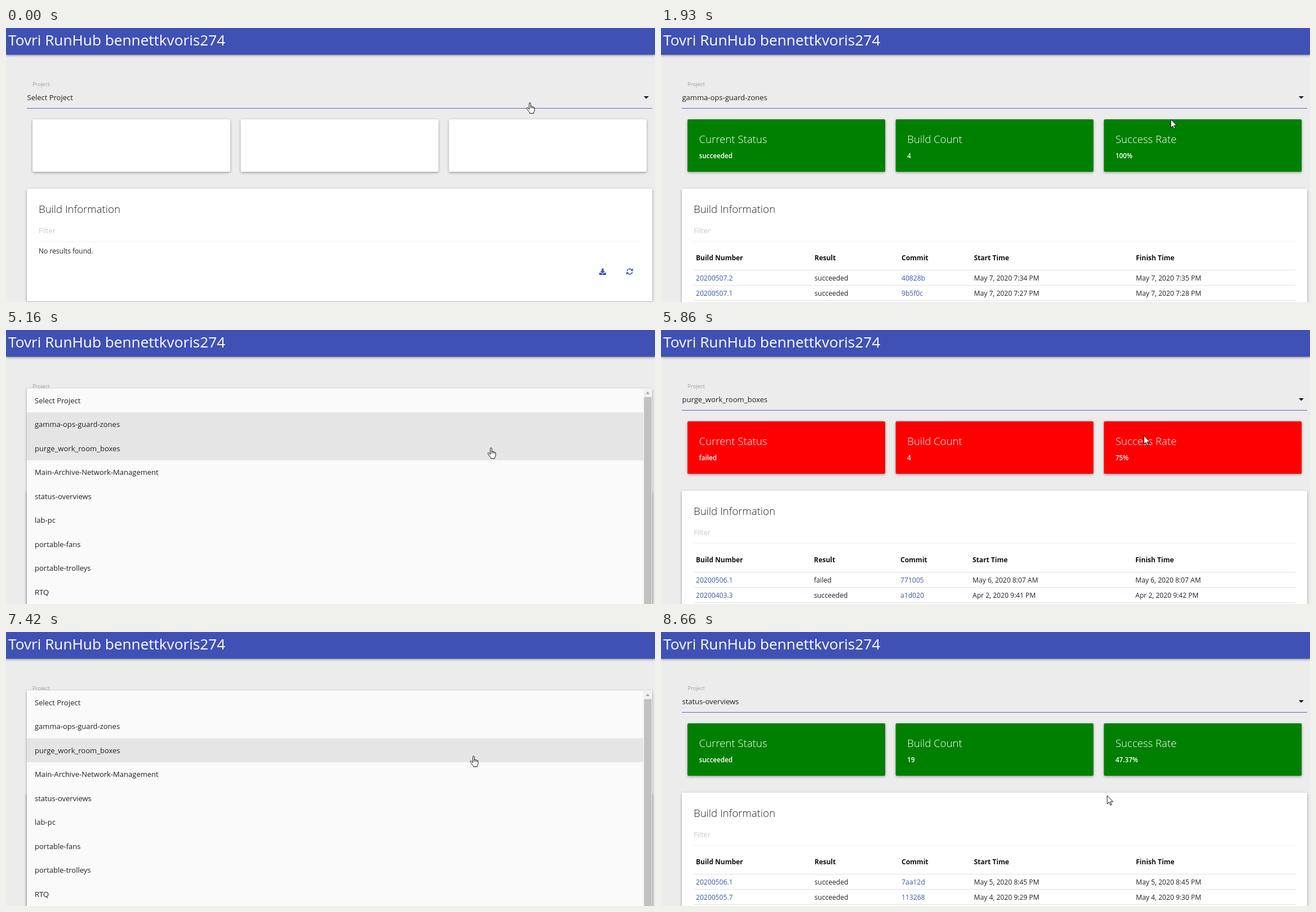
These frames come from a looping animation (1152x486 px, 9520 ms). An HTML page with a canvas:

```html
<!DOCTYPE html>
<html lang="en">
<head>
<meta charset="utf-8">
<title>Build dashboard</title>
<style>
  html, body { margin: 0; width: 100%; height: 100%; overflow: hidden; background: #ececec; }
  canvas { display: block; }
</style>
</head>
<body>
<canvas id="stage" width="1152" height="486"></canvas>
<script>
const stage = document.getElementById('stage').getContext('2d');
const layer = new OffscreenCanvas(1152, 486).getContext('2d');
let ctx = stage; // current drawing surface
const LOOP = 9520, BLUE = '#3f51b5', INK = '#212121';

const OPTIONS = ['Select Project', 'gamma-ops-guard-zones', 'purge_work_room_boxes',
  'Main-Archive-Network-Management', 'status-overviews', 'lab-pc',
  'portable-fans', 'portable-trolleys', 'RTQ'];

const COLUMNS = [62, 272.5, 427, 555.5, 843];
const HEADINGS = ['Build Number', 'Result', 'Commit', 'Start Time', 'Finish Time'];

// Page contents, each valid from its time on
const PAGES = [
  { from: 0, option: 0 },
  { from: 1930, option: 1, color: 'green', stats: ['succeeded', '4', '100%'], rows: [
    ['20200507.2', 'succeeded', '40828b', 'May 7, 2020 7:34 PM', 'May 7, 2020 7:35 PM'],
    ['20200507.1', 'succeeded', '9b5f0c', 'May 7, 2020 7:27 PM', 'May 7, 2020 7:28 PM']] },
  { from: 5480, option: 2, color: 'red', columns: [62, 271.5, 425, 553, 842],
    stats: ['failed', '4', '75%'], rows: [
    ['20200506.1', 'failed', '771005', 'May 6, 2020 8:07 AM', 'May 6, 2020 8:07 AM'],
    ['20200403.3', 'succeeded', 'a1d020', 'Apr 2, 2020 9:41 PM', 'Apr 2, 2020 9:42 PM']] },
  { from: 8660, option: 4, color: 'green', stats: ['succeeded', '19', '47.37%'], rows: [
    ['20200506.1', 'succeeded', '7aa12d', 'May 5, 2020 8:45 PM', 'May 5, 2020 8:45 PM'],
    ['20200505.7', 'succeeded', '113268', 'May 4, 2020 9:29 PM', 'May 4, 2020 9:30 PM']] }
];

const MENUS = [
  { open: 690, hover: 1230, click: 1690, close: 1740, before: 0, after: 1 },
  { open: 3385, hover: 4390, click: 5310, close: 5290, before: 1, after: 2 },
  { open: 6785, hover: 7270, click: 8280, close: 8360, before: 2, after: 4 }
];

// Screen refresh bursts: start, end, number of steps
const BURSTS = [[610, 1000, 6], [1230, 1460, 4], [1690, 1930, 4], [2470, 3080, 9],
  [3310, 3620, 5], [4390, 5160, 11], [5310, 5480, 3], [5790, 6400, 9], [6710, 6960, 4],
  [7270, 7800, 8], [8280, 8280, 1], [8430, 8520, 2], [8660, 8660, 1]];

// Pointer path: time, x, y
const PATH = [[0, 930, 132.5], [1153, 930, 132.5], [1460, 905, 162], [2394, 905, 162],
  [3080, 909.5, 129.5], [4313, 909.5, 129.5], [4390, 908, 148], [5160, 861, 209],
  [5310, 861, 209], [5480, 857, 201], [5714, 857, 201], [6400, 858, 140], [7195, 858, 140],
  [7270, 857, 144], [7345, 846, 176], [7421, 830, 220], [7800, 792, 290], [LOOP, 792, 290]];

const HAND = new Path2D('M5.5 12.5V2Q5.5.6 6.8.6T8.1 2V7.5Q8.3 6.6 9.4 6.6T10.7 8' +
  'Q11 7.3 12 7.5T13 9Q13.4 8.4 14.2 8.7T15 10.2V13Q15 16 13.2 18V19.5H6.5V18' +
  'Q4 15.5 2.8 13.5Q1 11 1 10Q1.6 8.8 3 9.6Q4.5 10.8 5.5 12.5ZM8.1 7.5V10.5M10.7 8V10.5M13 9V11');
const ARROW = new Path2D('M.5.5V15.5L3.9 12.3L6.2 17.7L8.4 16.8L6.1 11.4H10.8Z');

function refreshTime(t) {
  const burst = BURSTS.filter(b => b[0] <= t).pop();
  if (!burst) return 0;
  const [start, end, steps] = burst;
  if (steps === 1) return start;
  const step = (end - start) / (steps - 1);
  return start + step * Math.min(steps - 1, Math.floor((t + 10 - start) / step));
}

function pointerAt(t) {
  const i = PATH.findIndex(p => p[0] > t);
  const [t0, x0, y0] = PATH[i - 1], [t1, x1, y1] = PATH[i];
  const k = (t - t0) / (t1 - t0);
  return { x: x0 + (x1 - x0) * k, y: y0 + (y1 - y0) * k };
}

function menuAt(t) {
  const menu = MENUS.find(m => t >= m.open && t < m.close + 180);
  if (!menu) return null;
  const closing = t >= menu.close;
  const p = closing ? (t - menu.close) / 250 : Math.min(1, (t - menu.open) / 150);
  return {
    ...menu, closing, opening: p < 1 && !closing,
    scale: closing ? 0.3 + 0.7 * 2 ** (-10 * p) : 1 - 0.7 * (1 - p) ** 5,
    alpha: closing ? (1 - p) ** 5 : 1 - (1 - p) ** 2,
    selected: t < menu.click ? menu.before : menu.after
  };
}

function text(str, x, y, size, color = INK, weight = 400) {
  ctx.font = `${weight} ${size}px "Open Sans", "Noto Sans", sans-serif`;
  ctx.fillStyle = color;
  ctx.fillText(str, x, y);
}

function rect(x, y, w, h, color) {
  ctx.fillStyle = color;
  ctx.fillRect(x, y, w, h);
}

function poly(color, ...points) {
  ctx.fillStyle = color;
  ctx.beginPath();
  points.forEach(p => ctx.lineTo(...p));
  ctx.closePath();
  ctx.fill();
}

function raised(x, y, w, h, color, radius = 2) {
  ctx.save();
  ctx.shadowColor = 'rgba(0,0,0,.36)';
  ctx.shadowBlur = 4;
  ctx.shadowOffsetY = 1.5;
  ctx.fillStyle = color;
  ctx.beginPath();
  ctx.roundRect(x, y, w, h, radius);
  ctx.fill();
  ctx.restore();
}

function drawIcons() {
  rect(1053, 434, 12, 4, BLUE);
  poly('#fff', [1053.2, 431], [1064.8, 431], [1059, 436.8]);
  poly(BLUE, [1054.6, 431], [1063.4, 431], [1059, 435.4]);
  rect(1057.3, 426.5, 3.4, 5, BLUE);

  ctx.strokeStyle = BLUE;
  ctx.lineWidth = 1.7;
  for (const turn of [0, Math.PI]) {
    ctx.save();
    ctx.translate(1107, 432);
    ctx.rotate(turn);
    ctx.beginPath();
    ctx.arc(0, 0, 4.7, Math.PI * 1.05, Math.PI * 1.8);
    ctx.stroke();
    poly(BLUE, [6, -5.8], [6, -1.2], [1.4, -1.2]);
    ctx.restore();
  }
}

function drawTable({ rows, columns = COLUMNS }) {
  HEADINGS.forEach((h, i) => text(h, columns[i], 412, 12, '#111', 700));
  rows.forEach((row, r) => row.forEach((cell, i) =>
    text(cell, columns[i], 448 + 27 * r, 12.1, i % 2 || i > 2 ? INK : '#3c57a6')));
  for (const y of [429, 456, 483]) rect(58, y, 1068, 1, '#e0e0e0');
}

function drawPage(page, lineColor) {
  rect(0, 0, 1152, 486, '#ececec');
  raised(0, -5, 1152, 52.5, BLUE, 0);
  text('Tovri RunHub bennettkvoris274', 4, 31, 26.2, '#fff');

  text('Project', 47, 103, 9.5, '#9e9e9e');
  text(OPTIONS[page.option], 37.5, 128, 13);
  poly('#111', [1132, 121], [1141, 121], [1136.5, 125.5]);
  rect(37, 142, 1110, 0.85, lineColor);

  ['Current Status', 'Build Count', 'Success Rate'].forEach((name, i) => {
    const x = 47 + 369.6 * i;
    raised(x, 162, 351, 93, page.color || '#fff');
    if (!page.stats) return;
    text(name, x + 20.5, 204, 18.6, '#fff', 300);
    text(page.stats[i], x + 20.5, 231, 11.7, '#fff', 600);
  });

  raised(37, 285, 1110, page.rows ? 230 : 200, '#fff');
  text('Build Information', 58, 328, 18.6, INK, 300);
  text('Filter', 58, 364, 12.8, '#c8c8c8');
  rect(58, 378, 1068, 1, '#eee');
  if (page.rows) {
    drawTable(page);
  } else {
    text('No results found.', 58, 400, 12);
    drawIcons();
  }
}

const MENU_TOP = 103.6, ROW = 42.5;

// Painted opaque on its own layer, so that the menu fades as one piece
function drawMenu(menu, hovered) {
  ctx = layer;
  ctx.clearRect(0, 0, 1152, 486);
  ctx.save();
  ctx.translate(37, MENU_TOP);
  ctx.scale(menu.scale, menu.scale);
  raised(0, 0, 1110, 560, '#fafafa');
  OPTIONS.forEach((name, i) => {
    if (i === menu.selected || i === hovered)
      rect(0, i * ROW, 1094.5, ROW, `rgba(0,0,0,${menu.opening ? 0.24 : 0.083})`);
    text(name, 14, i * ROW + 26.2, 13);
  });
  rect(1094.5, 0, 15.5, 560, '#f1f1f1');
  rect(1095.5, 15.5, 13.5, 500, '#c1c1c1');
  poly('#a3a3a3', [1098.5, 10], [1105.5, 10], [1102, 6]);
  ctx.restore();

  ctx = stage;
  ctx.globalAlpha = menu.alpha;
  ctx.drawImage(layer.canvas, 0, 0);
  ctx.globalAlpha = 1;
}

function drawPointer({ x, y }, isHand) {
  ctx.save();
  ctx.translate(isHand ? x - 6.8 : x - 0.5, isHand ? y - 0.6 : y - 0.5);
  ctx.fillStyle = '#fff';
  ctx.strokeStyle = '#111';
  ctx.lineWidth = 1;
  const shape = isHand ? HAND : ARROW;
  ctx.fill(shape);
  ctx.stroke(shape);
  ctx.restore();
}

function draw(now) {
  const t = refreshTime(now % LOOP);
  const pointer = pointerAt(t), menu = menuAt(t);
  drawPage(PAGES.filter(p => p.from <= t + 0.5).pop(), menu ? INK : BLUE);
  if (menu) {
    const hovered = t >= menu.hover ? Math.floor((pointer.y - MENU_TOP) / ROW) : -1;
    drawMenu(menu, hovered);
  }
  drawPointer(pointer, pointer.y < 143 || (menu && !menu.closing));
  requestAnimationFrame(draw);
}
requestAnimationFrame(draw);
</script>
</body>
</html>
```
